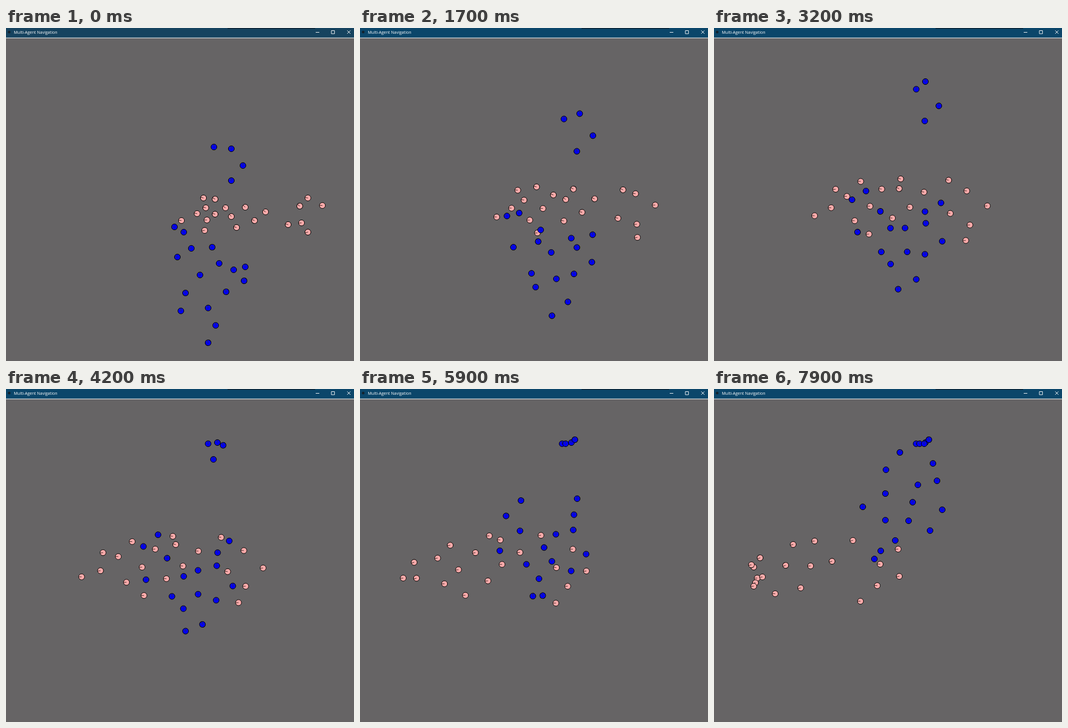
Recreate the animation shown at these times as an HTML page. Size 600x575 px, loop 8 s.

```html
<!DOCTYPE html>
<html lang="en">
<head>
<meta charset="utf-8">
<title>Multi-Agent Navigation</title>
<style>
  html, body { margin: 0; width: 100%; height: 100%; overflow: hidden; background: #666465; }
  svg { display: block; width: 600px; height: 575px; }
  text { font: 7.05px "Open Sans", "Noto Sans", sans-serif; fill: #fff; }
  .controls { fill: none; stroke: #fff; stroke-width: .9; }
  .agent circle { stroke: #000; stroke-width: .9; }
  .pink circle { fill: #ffabab; }
  .blue circle { fill: #0000f0; }
  .agent line { stroke: #1c1412; stroke-width: .8; }
  .blue line { stroke: #34343c; }
</style>
</head>
<body>
<svg viewBox="0 0 600 575">
  <rect width="600" height="575" fill="#666465"/>
  <rect id="bar" width="600" height="17" fill="#0b466a"/>
  <rect x="382" width="151" height="1.2" fill="#0a1c2a"/>
  <rect y="16.6" width="600" height="1.1" fill="#e4e7e9"/>
  <circle cx="5.5" cy="7" r="2.3" fill="#14222c"/>
  <text x="13.5" y="10">Multi-Agent Navigation</text>
  <path class="controls" d="M534 7.5h6.2M561 4.5h5.4v5.4h-5.4zM588.3 4.3l5.6 5.6m0-5.6l-5.6 5.6"/>
  <g id="agents" transform="translate(.5 .5)"></g>
</svg>
<script>
const LOOP = 8000, STEP = 100, END = LOOP - STEP;
const NS = 'http://www.w3.org/2000/svg';
const layer = document.getElementById('agents');
const bar = document.getElementById('bar');
const agents = [];

function add(parent, tag, attrs) {
  const el = parent.appendChild(document.createElementNS(NS, tag));
  for (const key in attrs) el.setAttribute(key, attrs[key]);
  return el;
}

// Parabola a + bu + cu² from start (u = 0) through mid (u = .5) to end (u = 1)
function parabola(start, mid, end) {
  const b = 4 * mid - 3 * start - end, c = 2 * (start + end) - 4 * mid;
  return { at: u => start + u * (b + u * c), slope: u => b + 2 * u * c };
}

// An agent steers from its start past a midpoint, and rests once it has arrived.
function agent(kind, start, mid, end, arrive = END) {
  const el = add(layer, 'g', { class: 'agent ' + kind });
  add(el, 'circle', { r: 5.1 });
  add(el, 'line', { x2: 4.8 });
  const [x, y] = [0, 1].map(i => parabola(start[i], mid[i], end[i]));
  agents.push({ el, x, y, arrive });
}
const pink = (...route) => agent('pink', ...route);
const blue = (...route) => agent('blue', ...route);

pink([302, 332], [193, 324], [74, 326], 5450);
pink([340, 293], [208, 278], [68, 307], 6460);
pink([329, 320], [198, 310], [71, 334], 6580);
pink([360, 295], [226, 263], [79, 291]);
pink([344, 310], [202, 289], [64, 303]);
pink([378, 310], [265, 276], [123, 304]);
pink([412, 309], [296, 255], [136, 268]);
pink([447, 317], [339, 280], [203, 297]);
pink([360, 321], [243, 307], [83, 324]);
pink([346, 331], [216, 333], [68, 340]);
pink([388, 325], [299, 270], [173, 262]);
pink([428, 332], [313, 306], [166, 305]);
pink([397, 344], [284, 327], [149, 343]);
pink([342, 349], [245, 356], [105, 353]);
pink([520, 293], [416, 279], [317, 276]);
pink([506, 307], [379, 257], [239, 261]);
pink([545, 306], [450, 308], [319, 323]);
pink([486, 339], [388, 316], [286, 302]);
pink([509, 336], [420, 340], [281, 339]);
pink([520, 352], [409, 368], [252, 366]);

blue([358, 205], [351, 155], [348, 94], 3500);
blue([388, 208], [379, 151], [364, 92], 3200);
blue([408, 237], [397, 168], [370, 87], 4450);
blue([388, 263], [368, 188], [354, 94], 4850);
blue([290, 343], [236, 278], [296, 139]);
blue([306, 352], [261, 259], [320, 109]);
blue([319, 380], [305, 329], [342, 195]);
blue([355, 378], [279, 298], [295, 180]);
blue([295, 395], [242, 335], [256, 203]);
blue([367, 406], [364, 291], [377, 128]);
blue([392, 417], [363, 313], [384, 158]);
blue([412, 412], [386, 272], [362, 94]);
blue([410, 436], [391, 347], [393, 208]);
blue([334, 426], [330, 321], [351, 165]);
blue([379, 455], [362, 371], [372, 244]);
blue([309, 457], [286, 365], [295, 226]);
blue([301, 488], [305, 386], [312, 261]);
blue([348, 483], [331, 362], [335, 227]);
blue([361, 513], [341, 413], [276, 293]);
blue([348, 543], [311, 426], [287, 279]);

function draw(t) {
  bar.setAttribute('fill', t < STEP ? '#16435f' : '#0b466a');
  for (const { el, x, y, arrive } of agents) {
    const u = Math.min(t / arrive, 1);
    const heading = Math.atan2(y.slope(u), x.slope(u)) * 180 / Math.PI;
    el.setAttribute('transform', `translate(${x.at(u)} ${y.at(u)}) rotate(${heading})`);
  }
}

function tick() {
  const t = performance.now() % LOOP;
  draw(Math.floor(t / STEP) * STEP);
  requestAnimationFrame(tick);
}
draw(0);
requestAnimationFrame(tick);
</script>
</body>
</html>
```
